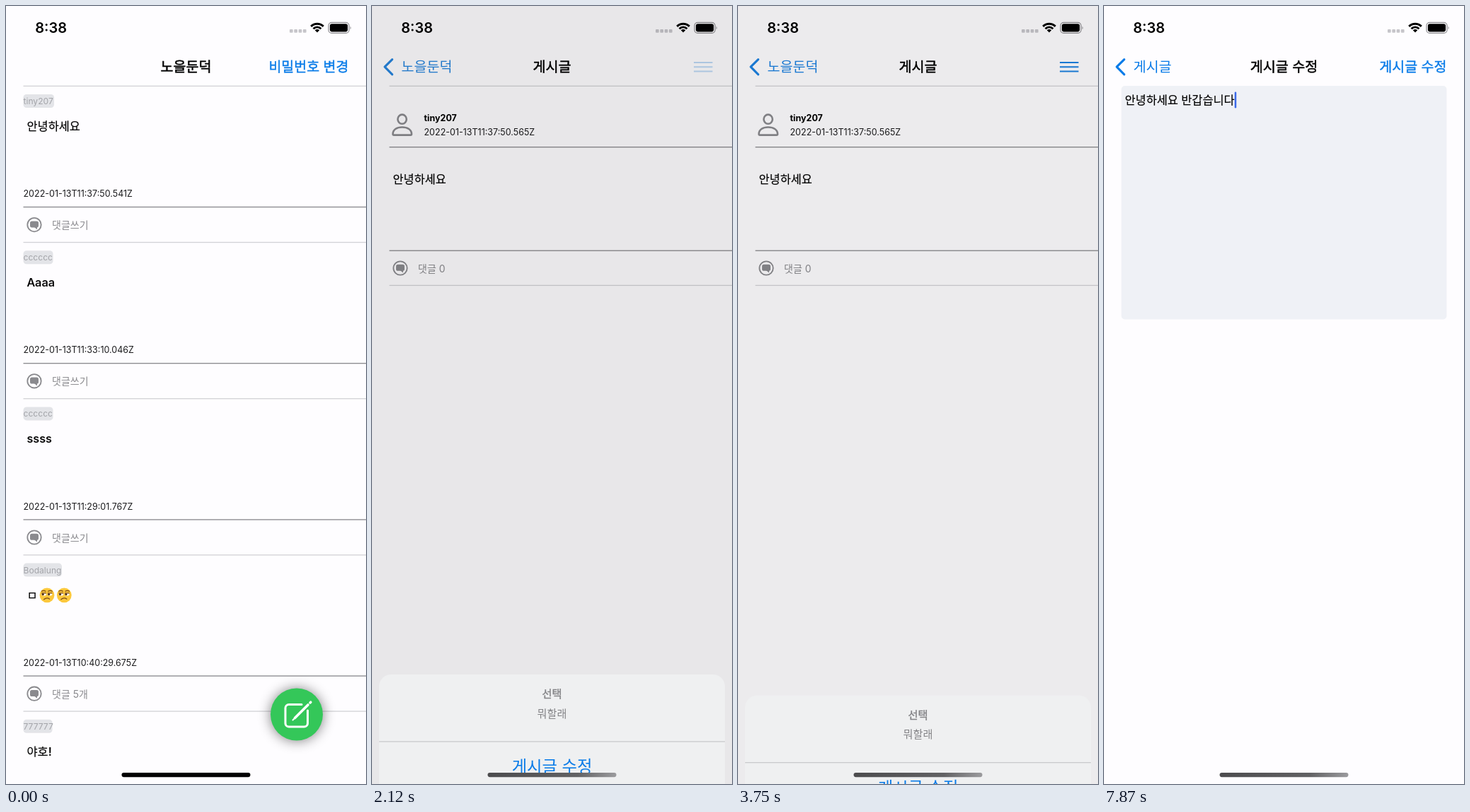
Animation, 509 px wide and 1101 px high, one loop 8 s. Source, as an HTML page:

```html
<!DOCTYPE html>
<html lang="ko">
<head>
<meta charset="utf-8">
<title>게시판</title>
<style>
  html, body { margin: 0; width: 100%; height: 100%; overflow: hidden; background: #fefdff; }
  svg { display: block; width: 509px; height: 1101px; overflow: hidden; }
  text { font-family: Inter, "Noto Sans CJK KR", "Noto Sans CJK", sans-serif; white-space: pre; }
</style>
</head>
<body>
<svg id="stage" viewBox="0 0 509 1101" xmlns="http://www.w3.org/2000/svg"></svg>
<script>
const W = 509, H = 1101;
const BG = '#fefdff', BLUE = '#087be8', GRAY = '#8a8a8e', FIELD = '#eff1f6';
const FARM = '노을둔덕', HELLO = '안녕하세요';

// ---- drawing helpers ----
const text = (x, cy, str, size, o = {}) =>
  `<text x="${x}" y="${cy + size * 0.37}" font-size="${size}" fill="${o.fill || '#000'}"
    font-weight="${o.weight || 400}" text-anchor="${o.anchor || 'start'}"
    ${o.bold ? `stroke="${o.fill || '#000'}" stroke-width="${o.bold}"` : ''}
    ${o.id ? `id="${o.id}"` : ''}>${str}</text>`;
const rect = (x, y, w, h, r, fill, more = '') =>
  `<rect x="${x}" y="${y}" width="${w}" height="${h}" rx="${r}" fill="${fill}" ${more}/>`;
const rule = (y, color, x = 24.5, w = W - x) => rect(x, y - 0.65, w, 1.3, 0, color);
const lightRule = y => rule(y, '#d2d2d6');
const darkRule = y => rule(y, '#88888c');
const group = (id, body) => `<g id="${id}">${body}</g>`;

const post = (cy, str, id) => text(29.5, cy, str, 16.4, { weight: 500, bold: 0.15, id });
const stamp = (x, cy, time) => text(x, cy, `2022-01-13T${time}Z`, 12.5, { fill: '#1c1c1e' });

const commentBar = (cy, label) => `
  <circle cx="40" cy="${cy}" r="9.7" fill="none" stroke="${GRAY}" stroke-width="1.8"/>
  ${rect(34, cy - 5.2, 12, 9, 2.6, GRAY)}
  <path d="M39.5 ${cy + 3} h4.5 v3.6 z" fill="${GRAY}"/>
  ${text(65, cy + 0.4, label, 14, { fill: GRAY })}`;

const unamused = (cx, cy) => `<g transform="translate(${cx} ${cy})">
  <circle r="10.4" fill="#fcc83c"/>
  <ellipse cx="-4.4" cy="-1.2" rx="3.3" ry="2" fill="#fff"/>
  <ellipse cx="4" cy="-1.2" rx="3.3" ry="2" fill="#fff"/>
  <circle cx="-5.8" cy="-1.2" r="1.6" fill="#4a2b12"/>
  <circle cx="2.6" cy="-1.2" r="1.6" fill="#4a2b12"/>
  <path d="M-7.8 -2.9 h6.6 M0.8 -2.9 h6.6" stroke="#7a4a16" stroke-width="1.2"/>
  <path d="M-7.6 -5.6 q3 -1.6 5.6 0 M1.6 -5.6 q3 -1.6 5.6 0 M-4.4 6 q4 -3.4 8 -0.6"
    fill="none" stroke="#7a4a16" stroke-width="1.3" stroke-linecap="round"/>
</g>`;

// ---- pages ----
const posts = [
  ['tiny207', 43.5, HELLO, '11:37:50.541', '댓글쓰기'],
  ['cccccc', 42, 'Aaaa', '11:33:10.046', '댓글쓰기'],
  ['cccccc', 42, 'ssss', '11:29:01.767', '댓글쓰기'],
  ['Bodalung', 54.5, 'ㅁ', '10:40:29.675', '댓글 5개'],
  ['777777', 41, '야호!', '10:38:12.310', '댓글쓰기'],
];
const listRow = ([user, w, body, time, label], i) => {
  const y = 113 + i * 221.2;
  return lightRule(y + 0.3)
    + rect(24.5, y + 12, w, 19, 4.5, '#e3e4e8')
    + text(24.5, y + 21.6, user, 12.1, { fill: '#a3a4a9' })
    + post(y + 57, body)
    + stamp(24.5, y + 152.5, time)
    + darkRule(y + 171.5)
    + commentBar(y + 196.6, label);
};
const writeButton = `
  <circle cx="411" cy="1003" r="37" fill="#000" opacity=".5" filter="url(#blur)"/>
  <circle cx="411" cy="1002.5" r="37" fill="#34c759"/>
  <g fill="none" stroke="#fff" stroke-width="3" stroke-linecap="round">
    <path d="M418 988.5 H400 a5 5 0 0 0 -5 5 V1015 a5 5 0 0 0 5 5 H421.5 a5 5 0 0 0 5 -5 V997"/>
    <path d="M408.5 1007.5 L427 989 M430 986 l.8 -.8" stroke-width="3.6"/>
    <path d="M405.5 1010.5 l3 -3" stroke-width="2"/>
  </g>`;
const listPage = rect(0, 0, W, H, 0, BG) + posts.map(listRow).join('')
  + unamused(58, 833.8) + unamused(82.3, 833.8) + writeButton;

const detailPage = rect(0, 0, W, H, 0, BG) + lightRule(113.3) + `
  <g fill="none" stroke="${GRAY}" stroke-width="2.6">
    <ellipse cx="42.6" cy="160.2" rx="6.2" ry="6.6"/>
    <path d="M29.5 181.2 C29.5 175 35 171.5 42.6 171.5 S56 175 56 181.2 Q56 182.6 54.6 182.6 H31 Q29.5 182.6 29.5 181.2 Z"/>
  </g>`
  + text(73.5, 158.6, 'tiny207', 12.5, { weight: 700 })
  + stamp(73.5, 178.3, '11:37:50.565')
  + darkRule(199.7) + post(245, HELLO) + darkRule(346.2)
  + commentBar(371, '댓글 0') + lightRule(395.4)
  + rect(12.5, 997.5, 484.5, 61.5, 24, FIELD)
  + text(24.5, 1028.3, '댓글을 입력해주세요', 19.5, { fill: '#b6b8be' });

const editPage = rect(0, 0, W, H, 0, BG)
  + rect(24.5, 113, 460, 330.5, 5, FIELD)
  + post(133.3, HELLO, 'draft')
  + rect(0, 121.5, 2.5, 23, 1.2, '#3b6ae8', 'id="caret"');

// ---- navigation bar ----
const navTitle = str => text(254.5, 86, str, 19.6, { anchor: 'middle', bold: 0.5 });
const navBack = str => text(41.5, 86, str, 19.6, { fill: 'currentColor' });
const navRight = str => text(484.5, 86, str, 19.5, { fill: BLUE, anchor: 'end', bold: 0.4 });
const menuIcon = '<path d="M455 80 H481.5 M455 86.2 H481.5 M455 92.5 H481.5" stroke="currentColor" stroke-width="1.9"/>';
const nav = (name, back, title, right) =>
  group(name + 'Back', back) + group(name + 'Title', title) + group(name + 'Right', right);
const navBar = `<g id="nav" color="${BLUE}">
  <path id="chevron" d="M28.6 75.6 L18 86.2 L28.6 96.8" fill="none" stroke="currentColor"
    stroke-width="3.1" stroke-linecap="round" stroke-linejoin="round"/>`
  + nav('list', '', navTitle(FARM), navRight('비밀번호 변경'))
  + nav('detail', navBack(FARM), navTitle('게시글'), menuIcon)
  + nav('edit', navBack('게시글'), navTitle('게시글 수정'), navRight('게시글 수정'))
  + '</g>';

const arc = (r, w) => {
  const d = r * Math.SQRT1_2;
  return `<path d="M${440 - d} ${37.6 - d} A${r} ${r} 0 0 1 ${440 + d} ${37.6 - d}" fill="none" stroke="#000" stroke-width="${w}"/>`;
};
const statusBar = text(41.3, 31, '8:38', 20, { weight: 600 })
  + [0, 1, 2, 3].map(i => rect(401 + i * 6.3, 33, 4.7, 4.8, 1, '#c6c5ca')).join('')
  + arc(12.4, 3) + arc(7.7, 2.9) + arc(2.3, 4.6)
  + rect(456, 23.3, 29, 15, 4.4, 'none', 'stroke="#8d8c90" stroke-width="1.2"')
  + rect(457.9, 25.2, 25.2, 11.2, 2.8, '#000')
  + '<path d="M486.6 28.4 q2.4 2.4 0 4.9 z" fill="#9a999d"/>';

// ---- action sheet, drawn from its own top edge ----
const choice = (cy, str, fill, bold) => text(254.5, cy, str, 23.3, { fill, bold, anchor: 'middle' });
const sheet = rect(10, 0, 489, 236, 17, '#eff0f1')
  + text(254.5, 27.8, '선택', 15.2, { fill: '#858588', bold: 0.45, anchor: 'middle' })
  + text(254.5, 55, '뭐할래', 15.2, { fill: '#858588', anchor: 'middle' })
  + rule(95, '#c9cacc', 10, 489) + rule(165.8, '#c9cacc', 10, 489)
  + choice(130.6, '게시글 수정', BLUE) + choice(201, '게시글 삭제', '#ee3b30')
  + rect(10, 246, 489, 70, 17, '#fefefe') + choice(281, '취소', BLUE, 0.6);

const $ = id => document.getElementById(id);
$('stage').innerHTML = `<defs>
    <filter id="blur" x="-50%" y="-50%" width="200%" height="200%"><feGaussianBlur stdDeviation="9"/></filter>
    <linearGradient id="bar"><stop offset="0" stop-color="#4c4c4e"/><stop offset=".7" stop-color="#626264"/>
      <stop offset="1" stop-color="#9b9b9e"/></linearGradient>
  </defs>`
  + group('list', listPage) + group('detail', detailPage) + group('edit', editPage)
  + navBar + statusBar
  + rect(0, 0, W, H, 0, '#000', 'id="dim"') + group('sheet', sheet)
  + rect(163.5, 1085, 182, 6.2, 3.1, '#000', 'id="home"');

// ---- timing, in ticks of 125 ms ----
const TICK = 125, LOOP = 8000;
const PUSH = [0.05, 0.45, 0.76, 0.92, 0.98, 1];
const RISE = [0.05, 0.433, 0.74, 0.91, 0.975, 1];
const FALL = [0.12, 0.65, 0.93, 1];
const CARET = [[0, 0], [42, 1], [44, 0.92], [46, 0.5], [47, 0], [49, 0.15], [50, 1]];
const TYPED = [[0, ''], [51, ' '], [53, ' ㅂ'], [57, ' 바'], [58, ' 반'], [59, ' 반가'], [60, ' 반갑'],
  [61, ' 반갑스'], [62, ' 반갑습니'], [63, ' 반갑습니다']];

const ramp = (table, start, n) => n < start ? 0 : table[Math.min(n - start, table.length - 1)];
const latest = (table, n) => table.filter(([from]) => from <= n).pop()[1];
const place = (id, x, y, opacity = 1) => {
  $(id).setAttribute('transform', `translate(${x} ${y})`);
  $(id).setAttribute('opacity', opacity);
};
const mix = (a, b, k) => `rgb(${a.map((v, i) => Math.round(v + (b[i] - v) * k))})`;

// enter: arrival of a page, leave: arrival of the page above it
function placePage(name, enter, leave) {
  const seen = enter * (1 - leave);
  place(name, W * (1 - enter) - W * 0.3 * leave, 0);
  place(name + 'Back', 170 * (1 - enter) - 110 * leave, 0, seen);
  place(name + 'Title', 240 * (1 - enter) - 200 * leave, 0, seen);
  place(name + 'Right', 0, 0, seen);
}

function draw(time) {
  const n = Math.min(63, Math.floor((time + 5) / TICK));
  const toDetail = ramp(PUSH, 4, n), toEdit = ramp(PUSH, 32, n);
  placePage('list', 1, toDetail);
  placePage('detail', toDetail, toEdit);
  placePage('edit', toEdit, 0);
  $('chevron').setAttribute('opacity', toDetail);

  const up = n < 29 ? ramp(RISE, 16, n) : 1 - ramp(FALL, 29, n);
  place('sheet', 0, 743 + 358 * (1 - up));
  $('dim').setAttribute('opacity', 0.2 * up);
  $('nav').setAttribute('color', mix([8, 123, 232], [169, 169, 171], up * up));
  if (n === 16 || n === 17) $('detailRight').setAttribute('opacity', 0.3);
  $('home').setAttribute('fill', n < 16 ? '#000' : 'url(#bar)');

  const draft = $('draft'), value = HELLO + latest(TYPED, n);
  if (draft.textContent !== value) draft.textContent = value;
  place('caret', 29.5 + draft.getComputedTextLength(), 0, latest(CARET, n));
}

const begin = performance.now();
function loop() {
  draw((performance.now() - begin) % LOOP);
  requestAnimationFrame(loop);
}
loop();
</script>
</body>
</html>
```
